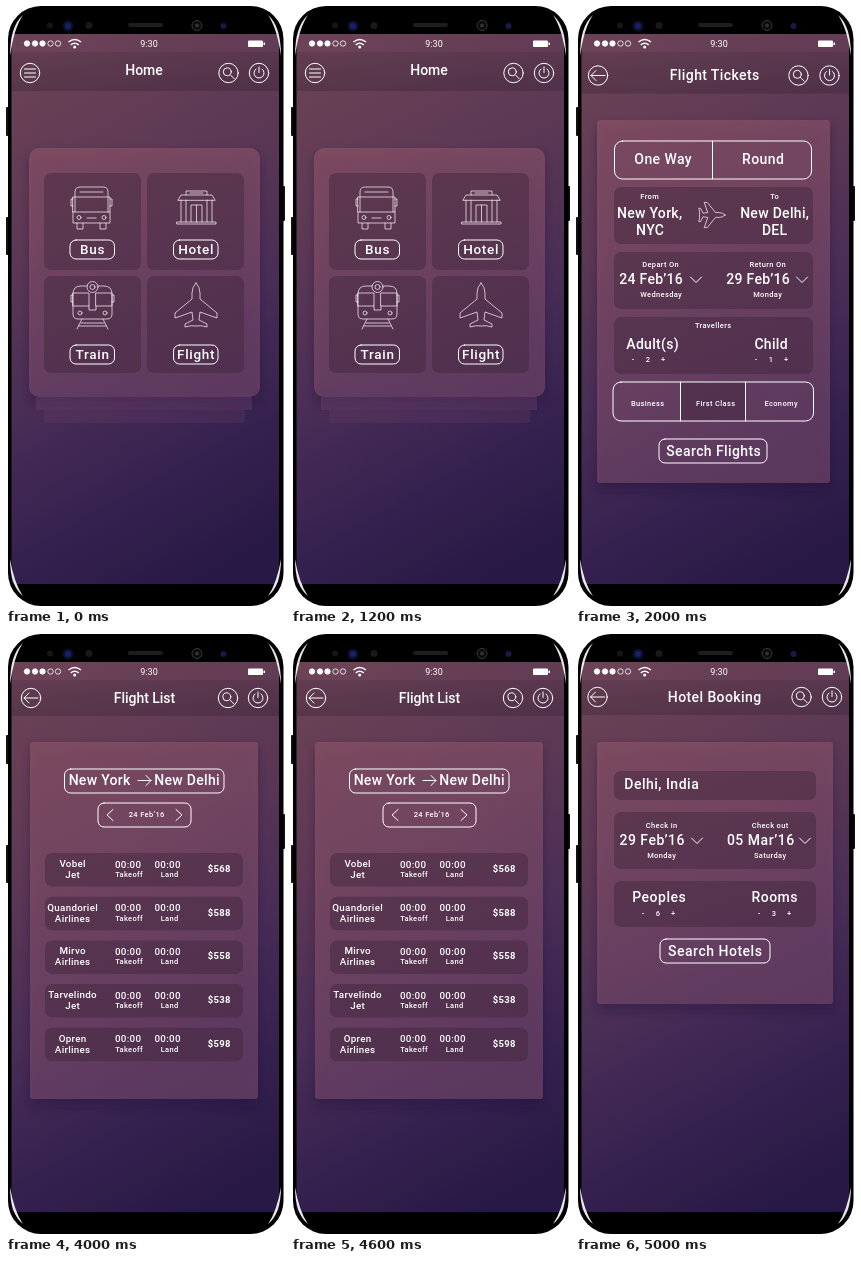
Write an HTML page that moves like this. It is 279x600 px and loops after 6000 ms.

```html
<!DOCTYPE html>
<html>
<head>
<meta charset="utf-8">
<style>
html, body { margin: 0; width: 100%; height: 100%; overflow: hidden; background: #fff; }
svg { display: block; width: 279px; height: 600px; }
text { font-family: Roboto, Arial, sans-serif; fill: #fff; }
.line { fill: none; stroke: #fff; stroke-width: 1; stroke-linecap: round; stroke-linejoin: round; }
.thin { stroke-width: .8; stroke: #eee3ea; }
.tile { fill: #42273e; fill-opacity: .48; }
.line path { vector-effect: non-scaling-stroke; }
</style>
</head>
<body>
<svg id="stage" viewBox="0 0 279 600" xmlns="http://www.w3.org/2000/svg"></svg>
<script>
const rect = (x, y, x2, y2, r, attrs) =>
  `<rect x="${x}" y="${y}" width="${x2 - x}" height="${y2 - y}" rx="${r}" ${attrs}/>`;
const circle = (x, y, r, attrs = 'class="line"') => `<circle cx="${x}" cy="${y}" r="${r}" ${attrs}/>`;
const path = (d, cls = 'line') => `<path d="${d}" class="${cls}"/>`;
const tile = (x, y, x2, y2) => rect(x, y, x2, y2, 7, 'class="tile"');
const box = (x, y, x2, y2, r = 6) => rect(x, y, x2, y2, r, 'class="line"');

// Centred text; half the spacing offsets the trailing gap.
const text = (s, x, y, size = 14, gap = .3, weight = 500) =>
  `<text x="${x + gap / 2}" y="${y}" font-size="${size}" letter-spacing="${gap}" font-weight="${weight}" text-anchor="middle">${s}</text>`;
const small = (s, x, y) => text(s, x, y, 7.5, .35);
const down = (x, y) => path(`M${x - 5.5} ${y - 3}l5.5 5.5 5.5-5.5`);
const stepper = (n, x, y) => small('-', x - 15, y) + small(n, x, y) + small('+', x + 15, y);

function card(x, y, x2, y2, r = 3) {
  return rect(x, y + 4, x2, y2 + 8, r, 'fill="#1d1036" opacity=".3" filter="url(#blur)"') +
    rect(x, y, x2, y2, r, 'fill="url(#card)"');
}

function header(title, y, base, gap, left, search, power, menu) {
  const icon = menu
    ? [-4, 0, 4].map(d => path(`M${left - 5.5} ${y + d}h11`)).join('')
    : path(`M${left + 7} ${y}h-14m5-5l-5 5 5 5`);
  return rect(5.5, 46, 273, y + 18, 0, 'fill="url(#bar)"') +
    text(title, menu ? 138 : 138.5, base, 14, gap) +
    circle(left, y, 9.7) + icon +
    circle(search, y, 9.7) + circle(search - 1.2, y - 1.2, 4) + path(`M${search + 2} ${y + 2}l3.8 3.8`) +
    circle(power, y, 9.7) + path(`M${power} ${y - 6}v5.5M${power - 3} ${y - 4}a5 5 0 1 0 6 0`);
}

const plane = '<path d="M190 277q-4 4-4 10v6l-17 14v5l17-6 1 8-8 4v3q6-2 11-1 5-1 11 1v-3l-8-4 1-8 17 6v-5l-17-14v-6q0-6-4-10z"/>';

function home() {
  const lamp = (x, y, r = 2) => circle(x, y, r, 'class="line thin"');
  const bus = path('M69 206v-20q0-5 5-5h23q5 0 5 5v20M74 186h23M67 191h37v15h-37zM67 206v11h37v-11M67 193h-2v7h2M104 193h2v7h-2M71 217v6h6v-6M94 217v6h6v-6M81 212h9', 'line thin') +
    lamp(73, 211.5) + lamp(98, 211.5);
  const hotel = path('M172 194l3-5h31l3 5zM180 189v-4h21v4M184 187h13M175 194v22M180 194v22M201 194v22M206 194v22M185 216v-17h11v17M190.500 199v17M171 216h39v2h-39z', 'line thin');
  const train = lamp(86.5, 281, 5.5) + lamp(86.5, 281, 2.5) +
    path('M81 280h-6q-8 0-8 8v20q0 5 5 5h29q5 0 5-5v-20q0-8-8-8h-6M67 287h16v13h-16zM90 287h16v13h-16zM83 300v4h7v-4M67 289h-2v7h2M106 289h2v7h-2M75 317h23M76 313l-5 10M97 313l5 10M73 320h27', 'line thin') +
    lamp(74, 307) + lamp(99, 307);
  const labels = [['Bus', 86, 234], ['Hotel', 189.5, 234], ['Train', 86, 339], ['Flight', 189.5, 339]];
  return header('Home', 67, 69, 0, 24, 222.5, 253, true) +
    card(23, 142, 254, 391, 10) +
    rect(30, 391, 246, 404, 1, 'fill="#6b4169" opacity=".4"') +
    rect(38, 404, 239, 417, 1, 'fill="#6b4169" opacity=".25"') +
    [38, 141].map(x => tile(x, 167, x + 97, 264) + tile(x, 270, x + 97, 367)).join('') +
    bus + hotel + train + `<g class="line thin">${plane}</g>` +
    labels.map(([s, x, y]) => box(x - 22, y, x + 22.5, y + 19) + text(s, x + .3, y + 14, 13.5, .7)).join('');
}

function tickets() {
  return header('Flight Tickets', 69.5, 73.5, .4, 22, 222.5, 253.5) +
    card(21, 114, 254, 477) +
    box(38.5, 135, 235.5, 173, 8) + path('M136.500 135v38') +
    text('One Way', 87, 158, 14, .4) + text('Round', 187, 158, 14, .4) +
    tile(38, 181, 237, 238) + small('From', 73.5, 193) + small('To', 198.5, 193) +
    text('New York,', 73.5, 212) + text('NYC', 74, 229) +
    text('New Delhi,', 198.5, 212) + text('DEL', 198.5, 229) +
    `<g class="line thin" transform="translate(136 209) rotate(90) scale(.6) translate(-190 -299)">${plane}</g>` +
    tile(38, 246, 237, 303) + small('Depart On', 84.5, 261) + small('Return On', 191.5, 261) +
    text('24 Feb’16', 75, 278) + down(120, 274) + text('29 Feb’16', 182, 278) + down(226, 274) +
    small('Wednesday', 85, 291) + small('Monday', 191.5, 291) +
    tile(38, 311, 237, 368) + small('Travellers', 137, 322) +
    text('Adult(s)', 76.5, 343) + text('Child', 195, 343) + stepper(2, 72, 356) + stepper(1, 195, 356) +
    rect(104.5, 376, 169.5, 415, 0, 'class="tile"') +
    box(37, 376, 237.5, 415, 8) + path('M104.500 376v39M169.500 376v39') +
    small('Business', 71.5, 400) + small('First Class', 139.5, 400) + small('Economy', 205, 400) +
    box(83, 433, 191, 457) + text('Search Flights', 137.5, 450, 14, .4);
}

function flights() {
  const rows = [['Vobel', 'Jet', 568], ['Quandoriel', 'Airlines', 588], ['Mirvo', 'Airlines', 558],
    ['Tarvelindo', 'Jet', 538], ['Opren', 'Airlines', 598]];
  const mid = (s, x, y) => text(s, x, y, 9.8, .3);
  return header('Flight List', 64, 69, -.05, 25, 222, 252) +
    card(24, 108, 252, 465) +
    box(58.5, 135, 218, 159) + text('New York', 93.5, 151) + text('New Delhi', 181, 151) +
    path('M132 146.500h13m-5-5l5 5-5 5') +
    box(92, 169, 185, 193) + small('24 Feb’16', 140.5, 183) +
    path('M107 175.500l-6 5.500 6 5.500M170 175.500l6 5.500-6 5.500') +
    rows.map(([a, b, price], i) => {
      const y = 219 + i * 43.7;
      return tile(39, y, 237, y + 33.5) +
        mid(a, 66.5, y + 14) + mid(b, 66.5, y + 25) +
        mid('00:00', 122, y + 14.5) + mid('00:00', 161.5, y + 14.5) +
        small('Takeoff', 123, y + 24) + small('Land', 163.5, y + 24) +
        text('$' + price, 213, y + 19, 9.5, .3, 700);
    }).join('');
}

function hotels() {
  const big = (s, x, y) => text(s, x, y, 14, .5);
  return header('Hotel Booking', 63, 68, .4, 21.5, 225.5, 256) +
    card(21, 108, 257, 370) +
    tile(38, 137, 240, 166) + big('Delhi, India', 85.5, 155) +
    tile(38, 178, 240, 235) + small('Check in', 85.5, 193.5) + small('Check out', 194, 193.5) +
    big('29 Feb’16', 76, 210.5) + down(121, 207) + big('05 Mar’16', 184.5, 210.5) + down(229, 207) +
    small('Monday', 85.5, 224) + small('Saturday', 194, 224) +
    tile(38, 247, 240, 293) + big('Peoples', 83, 268) + big('Rooms', 198.5, 268) +
    stepper(6, 82, 282) + stepper(3, 198, 282) +
    box(84, 305, 194, 329) + big('Search Hotels', 139, 322);
}

function phone() {
  const fill = c => `fill="${c}"`;
  const glints = '<path d="M4 50Q4 20 17 9Q8 22 4 50zM4 553Q4 580 17 590Q8 577 4 553z" fill="#fff" opacity=".9"/>';
  return rect(0, 101, 4, 130, 1, fill('#111')) + rect(0, 211, 4, 249, 1, fill('#111')) +
    rect(275, 180, 279, 215, 1, fill('#111')) +
    rect(2, 0, 277.5, 600, 33, fill('#000')) +
    circle(44, 19.5, 3, fill('#161618')) +
    circle(62, 20, 5.5, fill('#0c0f2c')) + circle(62, 20, 3, fill('#182068')) +
    circle(83, 19.5, 3.5, fill('#19191c')) + rect(122, 17, 157, 21, 2, fill('#1e1e20')) +
    circle(191, 19.5, 5, 'fill="#0b0b0d" stroke="#3a3a3d"') + circle(191, 19.5, 2, fill('#303036')) +
    circle(217.5, 20, 3, fill('#171a45')) +
    rect(5.5, 28, 273, 578, 4, fill('url(#back)')) +
    glints + `<g transform="translate(279) scale(-1 1)">${glints}</g>`;
}

function status() {
  return [21, 29, 36.5, 44.5, 52].map((x, i) =>
      circle(x, 37.5, 2.7, `fill="${i < 3 ? '#fff' : 'none'}" stroke="#fff" stroke-width=".8"`)).join('') +
    '<g stroke-width="1.5" fill="none" stroke="#fff"><path d="M62.500 36q6.200-5 12.500 0M64.800 38.800q3.900-3.200 7.900 0"/></g>' +
    circle(68.7, 41, 1.5, 'fill="#fff"') +
    text('9:30', 143, 41, 9, .1, 400) +
    rect(242, 34.5, 257, 41, 1, 'fill="#fff"') + rect(257.5, 36.5, 259, 39, .5, 'fill="#fff"');
}

const defs = `<defs>
  <linearGradient id="back" gradientUnits="userSpaceOnUse" x1="20" y1="60" x2="279" y2="530">
    <stop stop-color="#6b4256"/><stop offset=".3" stop-color="#5c3854"/>
    <stop offset=".55" stop-color="#4a2e56"/><stop offset=".8" stop-color="#35214f"/><stop offset="1" stop-color="#281845"/>
  </linearGradient>
  <linearGradient id="card" x2=".3" y2="1">
    <stop stop-color="#8a5266" stop-opacity=".75"/><stop offset="1" stop-color="#7a4c6e" stop-opacity=".6"/>
  </linearGradient>
  <linearGradient id="bar" x2="0" y2="1">
    <stop stop-color="#2b1a2c" stop-opacity=".14"/><stop offset="1" stop-color="#2b1a2c" stop-opacity=".28"/>
  </linearGradient>
  <filter id="blur"><feGaussianBlur stdDeviation="5"/></filter>
</defs>`;

const stage = document.getElementById('stage');
stage.innerHTML = defs + phone() + status() +
  [home, tickets, flights, hotels].map(f => `<g class="page">${f()}</g>`).join('');
const pages = [...stage.querySelectorAll('.page')];
const ends = [2000, 4000, 5000, 6000];

function draw() {
  const t = performance.now() % 6000;
  const current = ends.findIndex(end => t < end);
  pages.forEach((p, i) => p.style.display = i === current ? '' : 'none');
  requestAnimationFrame(draw);
}
draw();
</script>
</body>
</html>
```
